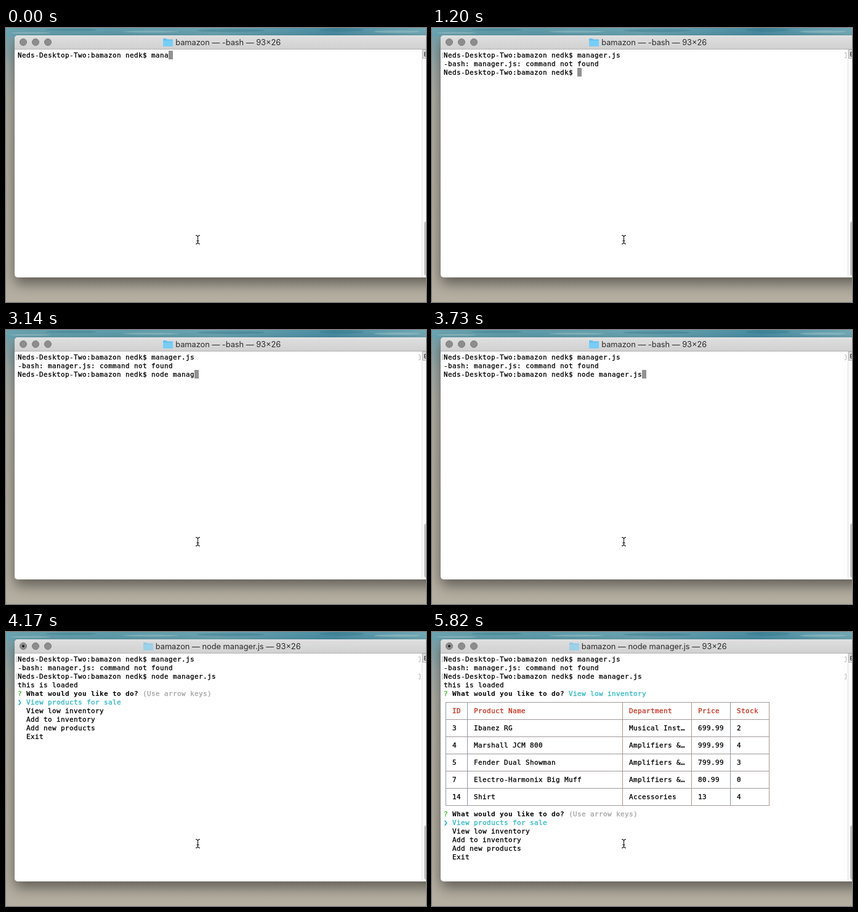
Animation of 682 by 446 pixels, one loop 8000 ms. Source, as an HTML page:

```html
<!DOCTYPE html>
<html lang="en">
<head>
<meta charset="utf-8">
<title>Terminal session</title>
<style>
  html, body { margin: 0; width: 100%; height: 100%; overflow: hidden; }
  svg { display: block; width: 682px; height: 446px; }
  .shadow { filter: drop-shadow(0 10px 11px rgba(0, 0, 0, .48)); }
  .title { font: 12.8px Inter, sans-serif; fill: #2a2a2a; text-anchor: middle; }
  #screen text {
    font: 11px "DejaVu Sans Mono", monospace;
    letter-spacing: calc(7px - 1ch);
    white-space: pre;
    color: #000;
    fill: currentColor;
    stroke: currentColor;
    stroke-width: .3px;
  }
  #screen .bold { font-weight: bold; stroke: none; }
  #screen .green { color: #35b824; }
  #screen .cyan { color: #2bb7c0; }
  #screen .red { color: #c8301c; }
  #screen .gray { color: #a2a2a2; }
  .mark { fill: none; stroke: #b4b4b4; }
  .cursor { fill: #929292; }
</style>
</head>
<body>
<svg viewBox="0 0 682 446">
  <defs>
    <linearGradient id="beach" x2="0" y2="1">
      <stop offset="0" stop-color="#6c9daa"/>
      <stop offset=".06" stop-color="#84a4a9"/>
      <stop offset=".14" stop-color="#a0aba8"/>
      <stop offset=".25" stop-color="#b0afa5"/>
      <stop offset=".6" stop-color="#b3ada0"/>
      <stop offset="1" stop-color="#b5afa1"/>
    </linearGradient>
    <linearGradient id="sea">
      <stop offset="0" stop-color="#6ba3b0"/>
      <stop offset=".25" stop-color="#5f9dac"/>
      <stop offset=".5" stop-color="#6ca6b3"/>
      <stop offset=".78" stop-color="#4a8ea4"/>
      <stop offset="1" stop-color="#74abb7"/>
    </linearGradient>
    <linearGradient id="bar" x2="0" y2="1">
      <stop offset="0" stop-color="#dfdfdf"/>
      <stop offset="1" stop-color="#d0d0d0"/>
    </linearGradient>
  </defs>

  <rect width="682" height="446" fill="url(#beach)"/>
  <rect width="682" height="14" fill="url(#sea)"/>
  <g fill="#2f7288" opacity=".35">
    <ellipse cx="105" cy="3" rx="42" ry="2"/>
    <ellipse cx="365" cy="4" rx="55" ry="2.5"/>
    <ellipse cx="545" cy="3" rx="36" ry="3"/>
  </g>
  <g fill="#b5d4d8" opacity=".4">
    <ellipse cx="40" cy="8" rx="32" ry="1.5"/>
    <ellipse cx="235" cy="6" rx="45" ry="1.5"/>
    <ellipse cx="635" cy="6" rx="38" ry="2"/>
  </g>

  <rect class="shadow" x="14" y="12" width="730" height="394" rx="5" fill="#fff"/>
  <path d="M14 35V17a5 5 0 0 1 5-5H682V35z" fill="url(#bar)"/>
  <path d="M18 12.5H682" stroke="#e8e8e8"/>
  <path d="M14 34.5H682" stroke="#b1b1b1"/>
  <g fill="#8d8d8d" stroke="#7b7b7b">
    <circle cx="28" cy="23" r="5.5"/>
    <circle cx="48" cy="23" r="5.5"/>
    <circle cx="68" cy="23" r="5.5"/>
  </g>
  <circle id="dot" cx="28" cy="23" r="2" fill="#1c1c1c"/>
  <g id="folder">
    <path d="M0 1.2Q0 0 1.2 0H5.2L6.8 1.6H14.8Q16 1.6 16 2.8V11.8Q16 13 14.8 13H1.2Q0 13 0 11.8z" fill="#64c0ee"/>
    <path d="M0 3.6H16V11.8Q16 13 14.8 13H1.2Q0 13 0 11.8z" fill="#78cdf7"/>
  </g>
  <text id="title" class="title" x="360.7" y="28"></text>

  <path d="M676 35H682V406H676z" fill="#fafafa"/>
  <path d="M675.5 35V406" stroke="#e2e2e2"/>
  <rect x="676.5" y="35.5" width="12" height="14" fill="#dcdcdc" stroke="#bdbdbd"/>
  <path d="M684 39.5H679.5V45.5H684M680 42.5H684" fill="none" stroke="#333"/>
  <rect x="679" y="315" width="9" height="88" rx="3.5" fill="#c2c2c2"/>

  <g id="screen"></g>

  <path d="M308 337.5H309.5L311.5 339.5L313.5 337.5H315M311.5 339V350M308 351.5H309.5L311.5 349.5L313.5 351.5H315M309.5 346.5H313.5" fill="none" stroke="#111" stroke-width="1.1"/>
</svg>

<script>
const LOOP = 8000;
const PROMPT = 'Neds-Desktop-Two:bamazon nedk$ ';
const FIRST = 'manager.js', SECOND = 'node manager.js';
const MENU = ['View products for sale', 'View low inventory', 'Add to inventory', 'Add new products', 'Exit'];

// [time, characters typed]
const FIRST_KEYS = [[0, 4], [150, 5], [300, 6], [450, 7], [600, 8], [750, 10]];
const SECOND_KEYS = [[1200, 0], [2550, 3], [2690, 5], [2840, 7], [2990, 8],
  [3140, 10], [3280, 11], [3430, 13], [3580, 14], [3730, 15]];
const ENTER_1 = 1200, ENTER_2 = 3880, RUNNING = 4030, ASK = 4170, DOWN = 5370, RESULT = 5820;
const CUES = [...FIRST_KEYS.map(k => k[0]), ...SECOND_KEYS.map(k => k[0]),
  ENTER_2, RUNNING, ASK, DOWN, RESULT];

const EDGES = [0, 5, 41, 57, 66, 75];
const TABLE = [
  ['ID', 'Product Name', 'Department', 'Price', 'Stock'],
  ['3', 'Ibanez RG', 'Musical Inst…', '699.99', '2'],
  ['4', 'Marshall JCM 800', 'Amplifiers &…', '999.99', '4'],
  ['5', 'Fender Dual Showman', 'Amplifiers &…', '799.99', '3'],
  ['7', 'Electro-Harmonix Big Muff', 'Amplifiers &…', '80.99', '0'],
  ['14', 'Shirt', 'Accessories', '13', '4']
];

const $ = id => document.getElementById(id);
const screen = $('screen');
const cellX = col => 19 + col * 7;
const cellY = row => 37 + row * 14;

function add(tag, attrs, text = '') {
  const el = document.createElementNS('http://www.w3.org/2000/svg', tag);
  for (const key in attrs) el.setAttribute(key, attrs[key]);
  el.textContent = text;
  screen.append(el);
}

const put = (col, row, text, style = '') =>
  add('text', { x: cellX(col), y: cellY(row) + 11, class: style }, text);

const cursor = (col, row) =>
  add('rect', { x: cellX(col), y: cellY(row), width: 7, height: 14, class: 'cursor' });

const line = (d, stroke) => add('path', { d, stroke });

function marks(row) {
  const y = cellY(row) + 3.5;
  add('path', { d: `M18 ${y}H16.5V${y + 8}H18M670 ${y}H672.5V${y + 8}H670`, class: 'mark' });
}

function typeLine(row, command, keys, t) {
  const count = keys.filter(k => k[0] <= t).pop()[1];
  put(0, row, PROMPT + command.slice(0, count));
  return PROMPT.length + count;
}

function question(row, tail, style) {
  put(0, row, '?', 'green');
  put(2, row, 'What would you like to do?', 'bold');
  put(29, row, tail, style);
}

function menu(row, chosen) {
  MENU.forEach((item, i) => {
    const style = i === chosen ? 'cyan' : '';
    if (style) put(0, row + i, '❯', style);
    put(2, row + i, item, style);
  });
}

function table(row) {
  const mid = r => cellY(r) + 7.5;
  const last = row + TABLE.length * 2;
  for (let r = row; r <= last; r += 2) line(`M22 ${mid(r)}H548`, '#a09a98');
  EDGES.forEach((col, i) => {
    const x = cellX(col) + 3.5;
    line(`M${x} ${mid(row)}V${mid(last)}`, [0, 1, 4].includes(i) ? '#8e98a8' : '#ab968d');
  });
  TABLE.forEach((cells, r) => cells.forEach((text, c) =>
    put(EDGES[c] + 2, row + 1 + r * 2, text, r ? '' : 'red')));
}

function draw(t) {
  screen.replaceChildren();
  const running = t >= RUNNING;
  $('title').textContent = `bamazon — ${running ? 'node manager.js' : '-bash'} — 93×26`;
  $('folder').setAttribute('transform', `translate(${running ? 223 : 255} 17)`);
  $('folder').setAttribute('opacity', running ? .6 : 1);
  $('dot').setAttribute('visibility', running ? 'visible' : 'hidden');

  const end = typeLine(0, FIRST, FIRST_KEYS, t);
  if (t < ENTER_1) return cursor(end, 0);
  marks(0);
  put(0, 1, '-bash: manager.js: command not found');

  const end2 = typeLine(2, SECOND, SECOND_KEYS, t);
  if (t < ENTER_2) return cursor(end2, 2);
  marks(2);
  if (t < ASK) return cursor(0, 3);

  put(0, 3, 'this is loaded');
  const hint = '(Use arrow keys)';
  if (t < RESULT) {
    question(4, t < DOWN ? hint : '', 'gray');
    menu(5, t < DOWN ? 0 : 1);
  } else {
    question(4, MENU[1], 'cyan');
    table(5);
    question(18, hint, 'gray');
    menu(19, 0);
  }
}

const start = performance.now();
let shown = -1;
function tick() {
  const t = (performance.now() - start) % LOOP;
  const cue = Math.max(...CUES.filter(c => c <= t));
  if (cue !== shown) draw(shown = cue);
  requestAnimationFrame(tick);
}
tick();
</script>
</body>
</html>
```
